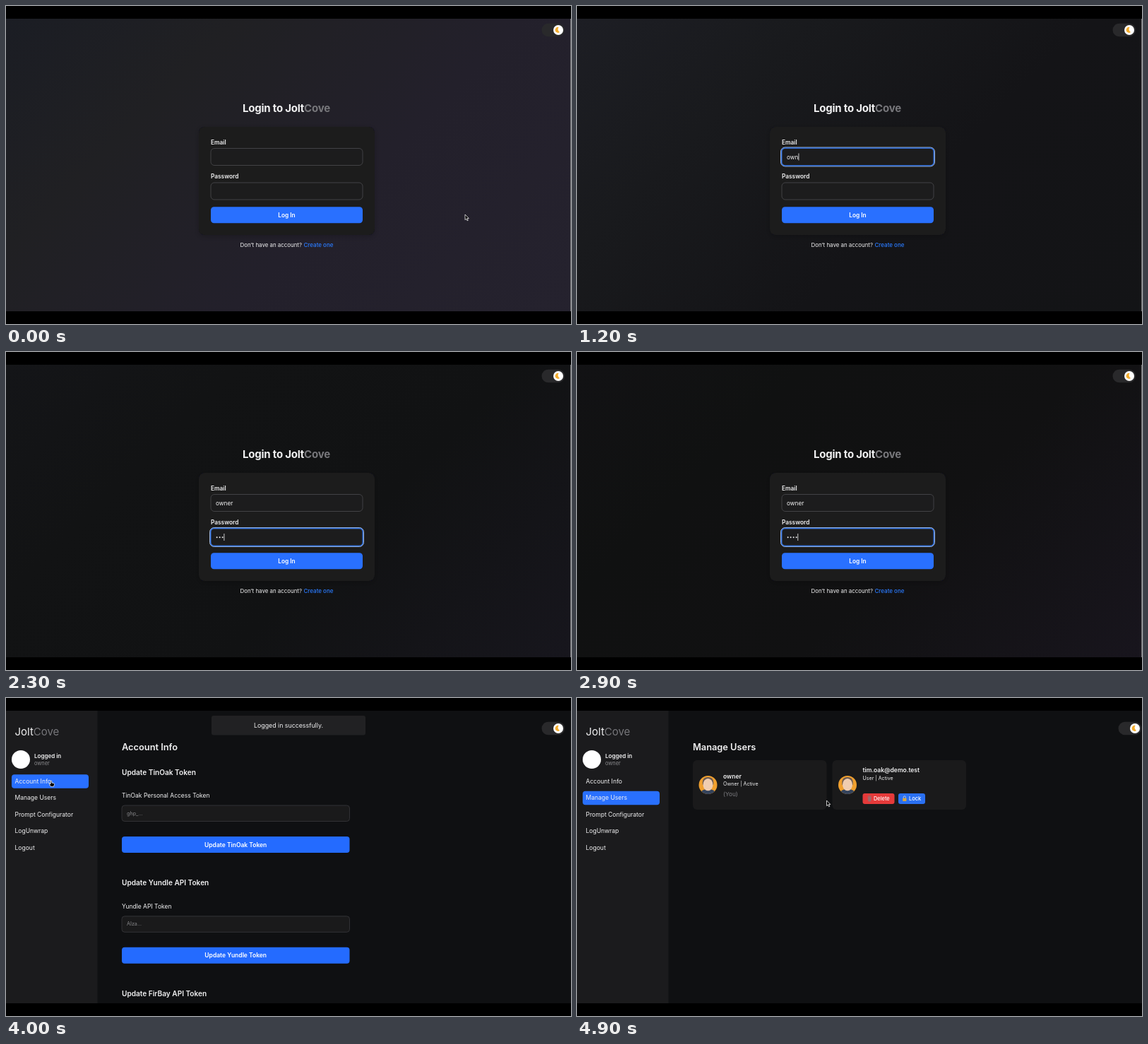
These frames come from a looping animation (800x450 px, 5000 ms). An HTML page:

```html
<!DOCTYPE html>
<html lang="en">
<head>
<meta charset="utf-8">
<title>Login walkthrough</title>
<style>
html, body { margin: 0; width: 100%; height: 100%; overflow: hidden; background: #000; }
svg { display: block; width: 800px; height: 450px; font-family: Inter, sans-serif; }
text { white-space: pre; }
</style>
</head>
<body>
<svg id="stage" viewBox="0 0 800 450"></svg>
<script>
const LOOP = 5000, STEP = 100;
const BLUE = '#2970ff', PANEL = '#1a1a1b', GREY = '#88888b', LIGHT = '#f1f1f2';
const USER = 'owner';

// Markup helpers
const text = (x, y, size, s, fill = LIGHT, weight = 400, anchor = 'start', more = '') =>
  `<text x="${x}" y="${y}" font-size="${size}" fill="${fill}" font-weight="${weight}" text-anchor="${anchor}" ${more}>${s}</text>`;
const rect = (x, y, w, h, r, fill, more = '') =>
  `<rect x="${x}" y="${y}" width="${w}" height="${h}" rx="${r}" fill="${fill}" ${more}/>`;
const circle = (x, y, r, fill, more = '') => `<circle cx="${x}" cy="${y}" r="${r}" fill="${fill}" ${more}/>`;
const path = (d, more) => `<path d="${d}" ${more}/>`;
const group = (id, ...parts) => `<g id="${id}">${parts.join('')}</g>`;
const stroke = (color, width = 1) => `stroke="${color}" stroke-width="${width}"`;
const chevron = (x, y) => path(`M${x - 1.8} ${y - 1}l1.8 1.8l1.8 -1.8`, `fill="none" ${stroke('#e4e4e8', .9)}`);
const dots = (n, x, y, gap) => Array.from({ length: n }, (_, i) => circle(x + i * gap, y, 1, LIGHT)).join('');
const brand = first => `<tspan fill="${first}">Jolt</tspan><tspan fill="#77777b">Cove</tspan>`;

const toggle = (id, x, y) => group(id,
  rect(x - 23.5, y - 9.3, 32.5, 18.6, 9.3, '#29292b'),
  circle(x, y, 7, '#fff'),
  path(`M${x + .6} ${y - 4}a4 4 0 1 0 1.4 7a4.6 4.6 0 0 1 -1.4 -7z`, 'fill="#f3ad2e"'));

const focusRing = (id, y) => group(id,
  rect(288.6, y - 1.4, 217.8, 26.8, 6, 'none', stroke('#dbe8fb', .9)),
  rect(289.6, y - .4, 215.8, 24.8, 5, 'none', stroke('#2f73e8', 1.5)));

const login = group('login',
  rect(0, 18, 800, 414, 0, 'url(#backdrop)'),
  rect(799, 18, 1, 414, 0, '#78787b'),
  toggle('loginToggle', 782, 34),
  text(335, 150, 15, 'Login to ' + brand(LIGHT), LIGHT, 700, 'start', 'letter-spacing="-.22"'),
  rect(273, 171, 249, 153, 8, PANEL, 'filter="url(#shadow)"'),
  text(290, 196, 8.3, 'Email', LIGHT, 600),
  text(290, 244.3, 8.3, 'Password', LIGHT, 600),
  [201.5, 250].map(y => rect(290, y, 215, 24, 5, '#1c1c1d', stroke('#47474a', .9))).join(''),
  focusRing('emailRing', 201.5), focusRing('passRing', 250),
  text(297, 216.5, 8.3, '', LIGHT, 400, 'start', 'id="email"'),
  `<g id="pass"></g>`,
  rect(0, 0, .8, 10, 0, '#f4f4f4', 'id="caret"'),
  rect(290, 284.3, 215, 23, 4.5, BLUE),
  text(397.5, 299, 8.3, 'Log In', '#fff', 600, 'middle'),
  text(331.5, 341.2, 7.9, 'Don’t have an account?'),
  text(421.5, 341.2, 8, 'Create one', '#2a7bff', 500),
  group('tip', rect(354, 226, 71, 10, 1, '#2b2b2d'),
    text(357, 233, 5.9, 'Please fill out this field.', '#e6e6e8', 500)));

const items = ['Account Info', 'Manage Users', 'Prompt Configurator', 'LogUnwrap', 'Logout'];
const sidebar = [
  rect(0, 18, 129.5, 414, 0, '#1b1b1d'),
  text(12.5, 52.6, 15, brand('#f1f1f2')),
  circle(21, 87, 13, '#fff'),
  text(40, 85.4, 8, 'Logged in', LIGHT, 600),
  text(40, 94.6, 7.4, USER, GREY),
  rect(8, 0, 109, 19.5, 4, BLUE, 'id="active"'),
  items.map((s, i) => text(12.5, 121 + i * 23.4, 8.55, s)).join('')
].join('');

const field = 'stroke="#232d39" stroke-width=".8"';
const summary = group('summary',
  toggle('wideToggle', 790, 43),
  text(147, 57.5, 16, 'LogUnwrap', LIGHT, 700),
  text(600, 74, 7.7, 'Choose which prompt and platform to use for the summary. If none is selected, the default prompt and platform will be used.', '#6d6d71', 400, 'end', 'font-style="italic"'),
  rect(147, 98.3, 268, 22.7, 3, '#17202a', field),
  rect(417.7, 98.3, 97, 22.7, 3, '#17202a', field),
  rect(517.2, 98.3, 96.4, 22.7, 3, '#17202a', field),
  text(425, 112.3, 7, 'Default Prompt'), chevron(508.5, 110),
  text(524, 112.3, 7, 'TinOak'), chevron(608, 110),
  rect(616, 97.5, 65, 23.7, 4, '#1f58e8'),
  text(648.5, 112.6, 8.1, 'Summarize', '#fff', 500, 'middle'));

const tokenForm = (dy, name, title, label, hint) => `<g transform="translate(0 ${dy})">` + [
  text(164, 108.5, 10.1, `Update ${name} ${title}`, LIGHT, 600),
  text(164, 141.4, 8.5, `${name} ${label}`),
  rect(164, 152, 322.5, 22.5, 4, PANEL, stroke('#353538', .9)),
  text(171, 165.7, 7.2, hint, GREY),
  rect(164, 196, 322.5, 23, 4, '#246bff'),
  text(325.2, 210.6, 8.5, `Update ${name} Token`, '#fff', 600, 'middle')
].join('') + '</g>';

const account = group('account',
  toggle('accountToggle', 782, 43),
  text(164, 74.4, 12.8, 'Account Info', LIGHT, 600),
  tokenForm(0, 'TinOak', 'Token', 'Personal Access Token', 'ghp_...'),
  tokenForm(156.8, 'Yundle', 'API Token', 'API Token', 'AIza...'),
  tokenForm(313.8, 'FirBay', 'API Token', 'API Token', ''));

const avatar = x => `<g transform="translate(${x} 123)">` + [
  circle(0, 0, 13, '#f0a02f'),
  path('M-9.4 9Q-7 6 0 6Q7 6 9.4 9A13 13 0 0 1 -9.4 9z', 'fill="#34435c"'),
  path('M-7.6 0Q-9 -11 0 -11Q9 -11 7.6 0z', 'fill="#6b5a52"'),
  `<ellipse cy="-.4" rx="7" ry="8.6" fill="#f0cdb0"/>`
].join('') + '</g>';

const users = group('users',
  toggle('usersToggle', 790, 43),
  text(164, 74.4, 12.8, 'Manage Users', LIGHT, 600),
  rect(164, 88, 189.5, 70, 6, PANEL), avatar(185.5),
  text(207, 113.5, 8.5, USER, LIGHT, 600),
  text(207, 123.8, 7.1, 'Owner | Active'),
  text(207, 138.6, 8.2, '(You)', '#6f6f73', 500),
  rect(361.5, 88, 189.5, 70, 6, PANEL), avatar(383),
  text(404.5, 105.4, 8.5, 'tim.oak@demo.test', LIGHT, 600),
  text(404.5, 115.6, 7.1, 'User | Active'),
  rect(404.5, 135, 45, 15, 3, '#e53a3a'),
  path('M412 140h4.4l-.6 6h-3.2zM411.6 138.6h5.2', `fill="#9c6a6c" ${stroke('#9c6a6c', .8)}`),
  text(420, 145.1, 7.4, 'Delete', '#fff', 500),
  rect(455, 135, 38, 15, 3, '#2a70f2'),
  path('M462.2 142v-1.6a1.6 1.6 0 0 1 3.2 0v1.6', `fill="none" ${stroke('#c9ced6', .9)}`),
  rect(461.2, 141.8, 5.2, 4.2, .6, '#d9a83e'),
  text(470, 145.1, 7.5, 'Lock', '#fff', 500));

const toast = group('toast',
  rect(291, 25, 218, 27.5, 3, '#212123'),
  text(449, 42, 8.8, 'Logged in successfully.', LIGHT, 400, 'end'));

const entry = stroke('#85858d', .9);
const popup = group('popup',
  path('M150.5 18H368V128a4 4 0 0 1 -4 4H154.5a4 4 0 0 1 -4 -4z', 'fill="#3a393f"'),
  text(160, 29.2, 6.8, 'Save password for http://localhost:3000?', '#fbfbfe', 600),
  text(160, 48.2, 6.8, 'Username', '#fbfbfe'),
  rect(160, 51.7, 198.5, 15, 2, '#333238', entry),
  text(163.5, 61.7, 6.9, USER, '#fbfbfe'), chevron(351.5, 59.5),
  text(160, 82.2, 6.8, 'Password', '#fbfbfe'),
  rect(160, 85.7, 198.5, 15.3, 2, '#333238', entry), dots(4, 165, 93.8, 3.4),
  path('M348 93.3q3.5 -4 7 0q-3.5 4 -7 0z', `fill="none" ${stroke('#e4e4e8', .9)}`),
  circle(351.5, 93.3, 1.1, '#e4e4e8'),
  rect(263, 106, 45, 17, 2, '#57565d'), text(285.7, 117, 6.95, 'Not now', '#fbfbfe', 600, 'middle'),
  rect(308.5, 106, 14, 17, 2, '#2b2a30'), chevron(315.5, 114.5),
  rect(325.5, 106, 33.5, 17, 2.5, '#00d3fb'), text(342.5, 117, 6.95, 'Save', '#15141a', 600, 'middle'));

const cursor = group('cursor',
  group('arrow', path('M0 0V7.6L1.8 6L3 8.8L4.3 8.2L3.1 5.5H5.3z', `fill="#000" ${stroke('#f2f2f2', .8)}`)),
  group('ibeam', path('M-1.8 -4Q0 -4 0 -2.8Q0 -4 1.8 -4M0 -3V3M-1.8 4Q0 4 0 2.8Q0 4 1.8 4', `fill="none" ${stroke('#e2e2e2', 1.1)}`)),
  group('hand', path('M-.9 .4Q0 -.6 .8 .4V3L4 3.8Q4.8 4.2 4.4 5.6L3.6 8.3H-.6L-2.8 5Q-2.5 4 -.9 4.8z', `fill="#000" ${stroke('#f5f5f5', .8)}`)));

document.getElementById('stage').innerHTML = `<defs>
  <linearGradient id="backdrop" gradientUnits="userSpaceOnUse" x1="96.5" y1="-78.5" x2="703.5" y2="528.5">
    ${[0, .27, .6, 1].map(o => `<stop offset="${o}"/>`).join('')}</linearGradient>
  <filter id="shadow"><feDropShadow dx="0" dy="2" stdDeviation="4" flood-opacity=".22"/></filter>
  <clipPath id="screen"><rect y="18" width="800" height="414"/></clipPath></defs>
  <g clip-path="url(#screen)">${login}` +
  group('app', rect(0, 18, 800, 414, 0, '#0f1012'), sidebar, summary, account, users, toast, popup) +
  cursor + '</g>';

const $ = id => document.getElementById(id);
const show = (id, on) => $(id).style.display = on ? '' : 'none';
const clamp = v => Math.max(0, Math.min(1, v));
const mix = (a, b, k) => a + (b - a) * k;

// Backdrop tints at four moments, four stops each
const tints = [
  [0, [[27, 29, 36], [32, 32, 35], [35, 32, 43], [37, 34, 46]]],
  [800, [[34, 35, 43], [29, 30, 35], [22, 22, 25], [17, 17, 18]]],
  [1700, [[22, 23, 27], [19, 20, 22], [17, 18, 20], [22, 23, 28]]],
  [2900, [[18, 18, 20], [16, 17, 17], [17, 17, 18], [24, 21, 29]]]
];
// Pointer way points: time, x, y
const route = [
  [0, 650, 295], [100, 640, 292], [500, 353.5, 214], [1400, 353.5, 214], [1600, 328, 267],
  [3100, 328, 267], [3500, 292, 117], [3600, 290, 117], [3900, 64, 117], [4100, 64, 117],
  [4400, 84, 140], [4600, 98, 139], [4800, 104, 139], [4900, 353.5, 145], [5000, 353.5, 145]
];
const segment = (keys, t) => {
  const i = Math.max(1, keys.findIndex(k => k[0] > t));
  const a = keys[i - 1], b = keys[i];
  return [a, b, clamp((t - a[0]) / (b[0] - a[0]))];
};
const typed = (t, start, gap, max) => Math.max(0, Math.min(max, Math.floor((t - start) / gap) + 1));

function drawLogin(t) {
  const [a, b, k] = segment(tints, Math.min(t, 2899));
  document.querySelectorAll('#backdrop stop').forEach((stop, i) =>
    stop.setAttribute('stop-color', `rgb(${a[1][i].map((v, c) => Math.round(mix(v, b[1][i][c], k)))})`));
  const inEmail = t >= 900 && t < 1600, inPass = t >= 1600;
  const count = typed(t, 1900, 200, 4);
  show('tip', t >= 700 && t < 900);
  show('emailRing', inEmail);
  show('passRing', inPass);
  $('email').textContent = USER.slice(0, typed(t, 1000, 100, USER.length));
  $('pass').innerHTML = dots(count, 298.6, 262.2, 4);
  show('caret', inEmail || inPass);
  $('caret').setAttribute('x', inPass ? 296.8 + count * 3.9 : 297 + $('email').getComputedTextLength());
  $('caret').setAttribute('y', inPass ? 257 : 208.5);
}

function drawApp(t) {
  const page = t < 4000 ? 3 : t < 4600 ? 0 : 1;
  show('summary', page === 3);
  show('account', page === 0);
  show('users', page === 1);
  show('popup', t >= 3100 && t < 3600);
  $('toast').setAttribute('opacity', clamp((4300 - t) / 200));
  $('active').setAttribute('y', 108.3 + page * 23.35);
}

function drawCursor(t) {
  const [a, b, k] = segment(route, t), ease = k * k * (3 - 2 * k);
  const x = mix(a[1], b[1], ease), y = mix(a[2], b[2], ease);
  const within = (x0, y0, x1, y1) => x >= x0 && x <= x1 && y >= y0 && y <= y1;
  const kind = t < 3000
    ? within(290, 201, 505, 226) || within(290, 250, 505, 274) ? 'ibeam' : 'arrow'
    : within(8, 108, 117, 221) || t < 3600 && within(263, 106, 359, 123) ? 'hand' : 'arrow';
  for (const id of ['arrow', 'ibeam', 'hand']) show(id, id === kind);
  // Typing hides the pointer
  show('cursor', !(t >= 1000 && t < 1400 || t >= 1900 && t < 3100));
  $('cursor').setAttribute('transform', `translate(${x} ${y})`);
}

const start = performance.now();
function frame() {
  const t = Math.floor(((performance.now() - start) % LOOP) / STEP) * STEP;
  show('login', t < 3000);
  show('app', t >= 3000);
  t < 3000 ? drawLogin(t) : drawApp(t);
  drawCursor(t);
  requestAnimationFrame(frame);
}
frame();
</script>
</body>
</html>
```
